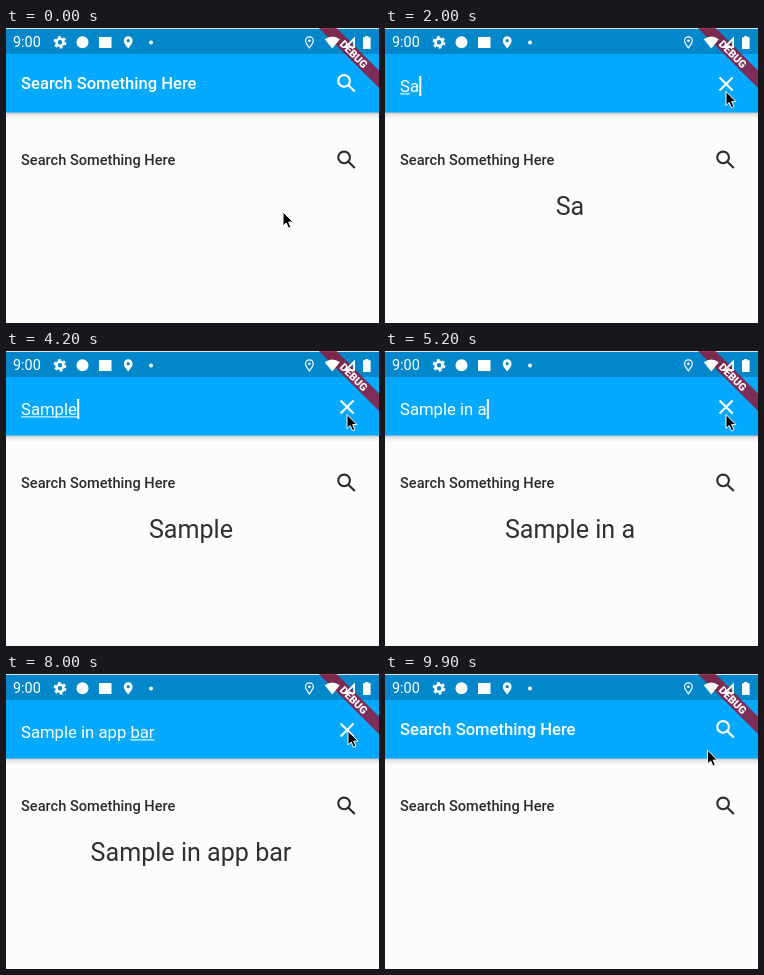
These frames come from a looping animation (373 by 295 pixels, 10000 ms). An HTML page:

```html
<!DOCTYPE html>
<html lang="en">
<head>
<meta charset="utf-8">
<title>Animated search bar</title>
<style>
  html, body { margin: 0; width: 100%; height: 100%; overflow: hidden; background: #fcfcfc; }
  svg { display: block; width: 373px; height: 295px; font-family: Roboto, "Noto Sans", sans-serif; }
  text { white-space: pre; }
  .title { font-size: 16.6px; font-weight: 500; fill: #fff; }
  .label { font-size: 14.6px; font-weight: 500; fill: #2b2b2b; }
  .field { font-size: 16.7px; fill: #fff; }
  .result { font-size: 25.1px; fill: #303030; text-anchor: middle; }
  .debug { font-size: 10.7px; font-weight: 900; fill: #fff; text-anchor: middle; }
</style>
</head>
<body>
<svg viewBox="0 0 373 295">
  <defs>
    <linearGradient id="shade" x2="0" y2="1">
      <stop offset="0" stop-color="#000" stop-opacity=".24"/>
      <stop offset=".4" stop-color="#000" stop-opacity=".08"/>
      <stop offset="1" stop-color="#000" stop-opacity="0"/>
    </linearGradient>
    <clipPath id="textClip"><rect x="13" y="35" width="307" height="40"/></clipPath>
    <clipPath id="iconClip"><rect x="325" y="43" width="32" height="26"/></clipPath>
    <g id="lens" fill="none" stroke-width="2.1">
      <circle cx="-2.3" cy="-2.3" r="5.8"/>
      <path d="M2 2L8.4 8.4"/>
    </g>
  </defs>

  <rect width="373" height="295" fill="#fcfcfc"/>
  <rect y="84" width="373" height="7" fill="url(#shade)"/>
  <rect y="26" width="373" height="58.5" fill="#03a9ff"/>
  <rect y="1" width="373" height="25" fill="#0287ca"/>
  <rect width="373" height="1" fill="#dfe7eb"/>

  <g clip-path="url(#textClip)">
    <text id="title" class="title" x="15" y="61.3">Search Something Here</text>
    <g id="field">
      <text id="typed" class="field" x="15" y="63.9"></text>
      <rect id="underline" y="65.4" height="1" fill="#fff"/>
      <rect id="caret" y="48" width="2" height="20" fill="#fff"/>
    </g>
  </g>
  <g clip-path="url(#iconClip)">
    <g id="openIcon"><use href="#lens" x="340.4" y="55.2" stroke="#fff"/></g>
    <path id="closeIcon" d="M334.6 49.6l13 13m0-13l-13 13" stroke="#fff" stroke-width="2.1"/>
  </g>

  <text class="label" x="15" y="137.2">Search Something Here</text>
  <use href="#lens" x="340.4" y="131.7" stroke="#2b2b2b"/>
  <text id="result" class="result" x="185" y="187"></text>

  <g transform="translate(373 1) rotate(45)">
    <rect x="-50" y="29.3" width="100" height="12.5" fill="#94173a" fill-opacity=".84"/>
    <text class="debug" y="39.4">DEBUG</text>
  </g>

  <g fill="#fff">
    <text x="7" y="19.2" font-size="14.4">9:00</text>
    <g fill="none" stroke="#fff">
      <circle cx="54" cy="14.3" r="3.5" stroke-width="2.6"/>
      <circle cx="54" cy="14.3" r="5.4" stroke-width="2" stroke-dasharray="2.83"/>
    </g>
    <circle cx="76.5" cy="14.3" r="6"/>
    <rect x="93" y="9" width="12.5" height="11"/>
    <path d="M122.2 20.5C119.6 17.2 117.8 15 117.8 12.7a4.4 4.4 0 0 1 8.8 0C126.6 15 124.8 17.2 122.2 20.5z"/>
    <circle cx="122.2" cy="12.7" r="1.6" fill="#0287ca"/>
    <circle cx="145" cy="14.5" r="2"/>
    <path d="M303.4 19.8C301 16.8 299.5 14.8 299.5 12.8a3.9 3.9 0 0 1 7.8 0C307.3 14.8 305.8 16.8 303.4 19.8z"
      fill="none" stroke="#fff" stroke-width="1.2"/>
    <circle cx="303.4" cy="12.8" r="1.3"/>
    <path d="M318.8 11.2Q326.3 6 333.8 11.2L326.3 20.5z"/>
    <path d="M349 8.5V20H337.5zM347.2 13L342 18.2H347.2z" fill-rule="evenodd"/>
    <path d="M357 9.3h2.2V8h3.2v1.3h2.2V21H357z"/>
  </g>

  <path id="mouse" d="M0 0V14L3.2 11L5.5 16.2L7.9 15.2L5.7 10.1H10z" fill="#000" stroke="#fff"/>
</svg>
<script>
const LOOP = 10000, SLIDE = 350, BLINK = 500, MARK_DELAY = 150;
const OPEN = 1100, FOCUS = 1600, CLEAR = 8300, CLOSE = 9150;
const FIELD_X = 15;
const phrase = "Sample in app bar";
const keyTimes = [1700, 2000, 2600, 2900, 3100, 3900, 4650, 4900, 5000, 5100,
                  5200, 5450, 5700, 5800, 5950, 6060, 6200];
// Pointer stops: time, x, y
const pointerPath = [[0, 277, 184], [1080, 341, 63.5], [6700, 341, 63.5],
                     [7800, 342, 57], [9350, 342, 57], [9850, 322.5, 76]];

const $ = id => document.getElementById(id);
const set = (id, name, value) => $(id).setAttribute(name, value);
const move = (id, x, y) => set(id, "transform", `translate(${x} ${y})`);
const show = (id, on) => set(id, "visibility", on ? "visible" : "hidden");
const clamp = v => Math.max(0, Math.min(1, v));
const ease = v => v * v * (3 - 2 * v);
const countBefore = t => keyTimes.filter(k => k <= t).length;

const pen = document.createElement("canvas").getContext("2d");
function widthOf(text) {
  pen.font = '16.7px Roboto, "Noto Sans", sans-serif';
  return pen.measureText(text).width;
}

function pointerAt(t) {
  const i = pointerPath.findIndex(p => p[0] > t);
  if (i < 0) return pointerPath.at(-1).slice(1);
  const [t0, x0, y0] = pointerPath[i - 1], [t1, x1, y1] = pointerPath[i];
  const k = ease((t - t0) / (t1 - t0));
  return [x0 + (x1 - x0) * k, y0 + (y1 - y0) * k];
}

function drawField(t) {
  const count = t < CLEAR ? countBefore(t) : 0;
  const text = phrase.slice(0, count);
  $("typed").textContent = text;
  $("result").textContent = text.trimEnd();

  // The underline follows the current word a moment after each key.
  const wordStart = text.lastIndexOf(" ") + 1;
  const marked = text.slice(0, Math.max(wordStart, Math.min(count, countBefore(t - MARK_DELAY))));
  const from = widthOf(text.slice(0, wordStart));
  set("underline", "x", FIELD_X + from);
  set("underline", "width", widthOf(marked) - from);

  const lastKey = t >= CLEAR ? CLEAR : count ? keyTimes[count - 1] : FOCUS;
  show("caret", t >= FOCUS && t < CLOSE && (t - lastKey) % (2 * BLINK) < BLINK);
  set("caret", "x", FIELD_X + widthOf(text) + .3);
}

function draw(t) {
  const open = clamp((t - OPEN) / SLIDE) - clamp((t - CLOSE) / SLIDE);
  move("title", -307 * open, 0);
  move("field", 307 * (1 - open), 0);
  move("openIcon", 0, -26 * open);
  move("closeIcon", 0, 26 * (1 - open));
  drawField(t);
  move("mouse", ...pointerAt(t));
}

const start = performance.now();
function tick() {
  draw((performance.now() - start) % LOOP);
  requestAnimationFrame(tick);
}
tick();
</script>
</body>
</html>
```
